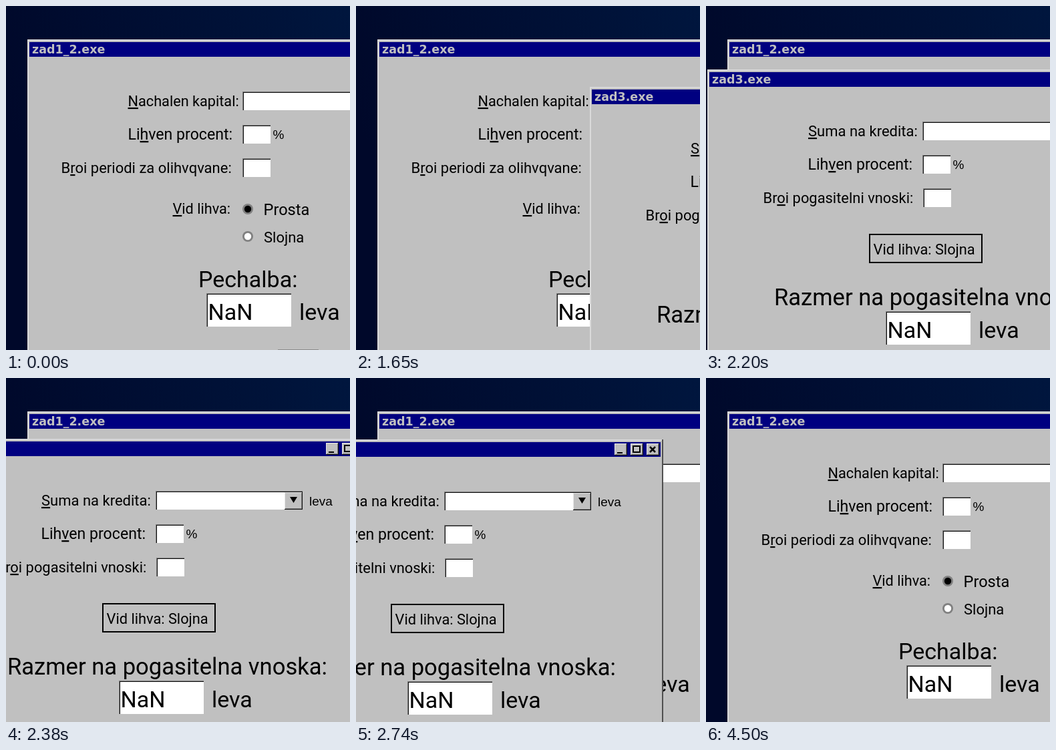
These frames come from a looping animation (515 by 515 pixels, 5650 ms). An HTML page:

```html
<!DOCTYPE html>
<html lang="bg-Latn">
<head>
<meta charset="utf-8">
<title>zad1_2.exe</title>
<style>
  html, body { margin: 0; width: 100%; height: 100%; overflow: hidden; background: #000a2c; }
  svg { display: block; width: 100%; height: 100%; }
  text { font-family: Roboto, sans-serif; white-space: pre; }
  .title { font: bold 17.5px "DejaVu Sans", sans-serif; fill: #c0c0c0; }
  .small { font: 19px "Liberation Sans", Arial, sans-serif; }
  .key { text-decoration: underline; text-decoration-thickness: 1.5px; }
</style>
</head>
<body>
<svg id="stage" viewBox="0 0 515 515">
  <defs>
    <linearGradient id="sky" x1="0" y1="0.3" x2="1" y2="0">
      <stop offset="0" stop-color="#00082a"/>
      <stop offset="1" stop-color="#00163e"/>
    </linearGradient>
  </defs>
  <rect width="515" height="515" fill="url(#sky)"/>
</svg>
<script>
const LOOP = 5650, WIDTH = 650, HEIGHT = 600;
const stage = document.getElementById('stage');

const rect = (x, y, w, h, fill) =>
  `<rect x="${x}" y="${y}" width="${w}" height="${h}" fill="${fill}"/>`;

// An underscore marks the following letter as the access key.
const text = (x, y, str, size = 22) =>
  `<text x="${x}" y="${y}" font-size="${size}">${str.replace(/_(.)/, '<tspan class="key">$1</tspan>')}</text>`;

const styled = (name, x, y, str) => `<text class="${name}" x="${x}" y="${y}">${str}</text>`;

const field = (x, y, w, h) =>
  rect(x, y, w, h, '#808080') + rect(x + 1, y + 1, w - 1, h - 1, '#101010') +
  rect(x + 2, y + 2, w - 2, h - 2, '#fff');

const raised = (x, y, w, h) =>
  rect(x, y, w, h, '#101010') + rect(x, y, w - 1, h - 1, '#e8e8e8') +
  rect(x + 1, y + 1, w - 2, h - 2, '#808080') + rect(x + 1, y + 1, w - 3, h - 3, '#c0c0c0');

const radio = (x, y, on) =>
  `<circle cx="${x}" cy="${y}" r="8" fill="#808080"/>
   <circle cx="${x}" cy="${y}" r="5.2" fill="${on ? '#000' : '#fff'}"/>`;

const caption = () =>
  [577, 601, 625].map(x => raised(x, 6, 19, 18)).join('') +
  rect(581, 19, 8, 2, '#000') +
  `<g fill="none" stroke="#000" stroke-width="2">
     <path d="M605 10h10v9h-10z"/><path d="M630 11l8 8M638 11l-8 8" stroke-width="2.5"/>
   </g>`;

const frame = title =>
  rect(0, 0, WIDTH, HEIGHT, '#505050') + rect(0, 0, WIDTH - 2, HEIGHT - 2, '#dadada') +
  rect(2, 2, WIDTH - 4, HEIGHT - 4, '#c0c0c0') + rect(3, 4, WIDTH - 7, 22, '#000080') +
  styled('title', 7, 20.5, title) + caption();

const combo = () =>
  field(322, 78, 220, 28) + raised(515, 80, 27, 26) +
  '<path d="M523 87h11l-5.5 9z"/>' + styled('small', 552, 100, 'leva');

const inputs = lastX =>
  combo() + field(322, 128, 42, 28) + field(lastX, 178, 42, 28) +
  styled('small', 367.5, 149, '%');

const result = (x, y) =>
  field(x, y, 127, 50) + text(x + 2.5, y + 40, 'NaN', 34) + text(x + 139, y + 40, 'leva', 34);

function addWindow(content) {
  const g = document.createElementNS('http://www.w3.org/2000/svg', 'g');
  g.innerHTML = content;
  stage.append(g);
  return g;
}

const profit = addWindow(
  frame('zad1_2.exe') + inputs(322) +
  text(150.5, 100, '_Nachalen kapital:', 21.7) +
  text(150.5, 150, 'Li_hven procent:', 23.1) +
  text(50.5, 200, 'B_roi periodi za olihvqvane:') +
  text(217.5, 261, '_Vid lihva:', 21.7) +
  radio(330, 254, true) + text(353.5, 263, 'Prosta', 23.6) +
  radio(330, 295, false) + text(354, 304, 'Slojna') +
  text(256, 371, 'Pechalba:', 34) + result(268, 380) +
  `<g id="edge">${rect(375, 464, 61, 1, '#8c8c8c')}</g>`);
profit.setAttribute('transform', 'translate(32 50)');
const edge = document.getElementById('edge');

const loan = addWindow(
  frame('zad3.exe') + inputs(323) +
  text(151, 100, '_Suma na kredita:') +
  text(150.5, 150, 'Lih_ven procent:', 23.1) +
  text(83.5, 200, 'Br_oi pogasitelni vnoski:', 21.9) +
  '<path d="M243 247h168v42h-168z" fill="none" stroke="#000" stroke-width="2"/>' +
  text(248.5, 277, 'Vid lihva: Slojna', 21.8) +
  text(100, 353, 'Razmer na pogasitelna vnoska:', 34.6) + result(267, 362));

// Drag path of the second window: time, x, y.
const drag = [
  [1410, 500, 133], [1920, 181, 107], [2200, 2, 95],
  [2380, -98, 91], [2530, -154, 90], [2740, -190, 92]
];

function slope(i, axis) {
  const a = drag[Math.max(i - 1, 0)], b = drag[Math.min(i + 1, drag.length - 1)];
  return (b[axis] - a[axis]) / (b[0] - a[0]);
}

function along(t, axis) {
  const last = drag.length - 1;
  if (t >= drag[last][0]) return drag[last][axis];
  let i = 0;
  while (t >= drag[i + 1][0]) i++;
  const a = drag[i], b = drag[i + 1], span = b[0] - a[0], u = (t - a[0]) / span;
  const h = u * u * (3 - 2 * u);
  return a[axis] + (b[axis] - a[axis]) * h +
    span * u * (1 - u) * ((1 - u) * slope(i, axis) - u * slope(i + 1, axis));
}

// The pointer is sampled every 30 ms.
function sample(t) {
  const base = t < 2200 ? 1410 : 2200;
  return base + Math.floor((t - base) / 30) * 30;
}

function fade(t) {
  if (t < 1410 || t >= 3890) return 0;
  return t < 3790 ? 1 : t < 3840 ? 0.66 : 0.33;
}

function draw(now) {
  const t = now % LOOP, opacity = fade(t);
  edge.style.display = t < 950 ? '' : 'none';
  loan.style.display = opacity ? '' : 'none';
  if (opacity) {
    const s = sample(t);
    loan.style.opacity = opacity;
    loan.setAttribute('transform', `translate(${Math.round(along(s, 1))} ${Math.round(along(s, 2))})`);
  }
}

const start = performance.now();
function tick() {
  draw(performance.now() - start);
  requestAnimationFrame(tick);
}
tick();
</script>
</body>
</html>
```
